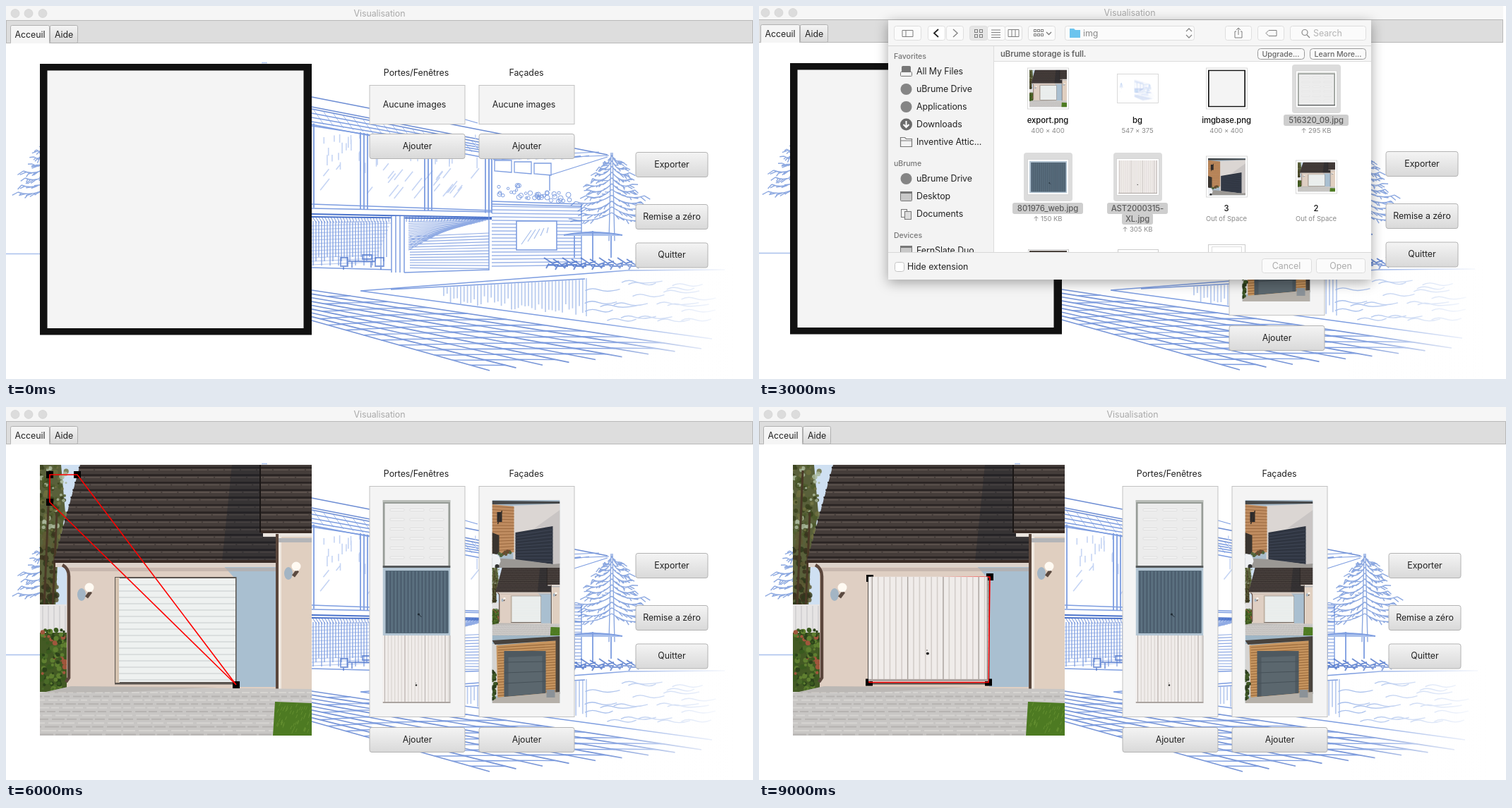
Write an HTML page that moves like this. It is 1058 px wide and 529 px high and loops after 10000 ms.

```html
<!DOCTYPE html>
<html lang="fr">
<head>
<meta charset="utf-8">
<title>Visualisation</title>
<style>
html, body { margin: 0; width: 100%; height: 100%; overflow: hidden; background: #fff; }
svg { display: block; }
text { font-family: Inter, "Open Sans", sans-serif; letter-spacing: -.06px; white-space: pre; }
#win { animation: nudge 10s step-end infinite; }
#dialog { filter: drop-shadow(0 4px 9px rgba(0,0,0,.35)); }
@keyframes nudge {
  0%, 40%, 100% { transform: none; }
  30% { transform: translate(-4px, -1px); }
}
</style>
</head>
<body>
<svg id="stage" width="1058" height="529" viewBox="0 0 1058 529"></svg>
<script>
let seed = 7;
const rnd = (a, b) => {
  seed = (seed * 16807) % 2147483647;
  return +(a + (b - a) * seed / 2147483647).toFixed(1);
};
const lerp = (a, b, t) => a + (b - a) * t;
const rep = (n, fn) => Array.from({ length: n }, (_, i) => fn(i)).join('');
const seg = (x1, y1, x2, y2) => `M${x1} ${y1}L${x2} ${y2}`;
const line = (d, color, w = 1, more = '') =>
  `<path d="${d}" fill="none" stroke="${color}" stroke-width="${w}" ${more}/>`;
const rect = (x, y, w, h, fill, more = '') =>
  `<rect x="${x}" y="${y}" width="${w}" height="${h}" fill="${fill}" ${more}/>`;
const box = (x, y, w, h, fill, edge, r = 0) =>
  rect(x + .5, y + .5, w - 1, h - 1, fill, `stroke="${edge}" rx="${r}"`);
const poly = (pts, fill, more = '') => `<polygon points="${pts}" fill="${fill}" ${more}/>`;
const dot = (x, y, r, fill, more = '') => `<circle cx="${x}" cy="${y}" r="${r}" fill="${fill}" ${more}/>`;
const text = (x, y, s, { anchor = 'middle', size = 12.4, fill = '#222', weight = 400 } = {}) =>
  `<text x="${x}" y="${y + size * .36}" text-anchor="${anchor}" font-size="${size}" fill="${fill}" font-weight="${weight}">${s}</text>`;
const symbol = (id, view, body) =>
  `<symbol id="${id}" viewBox="${view}" preserveAspectRatio="none">${body}</symbol>`;
const use = (id, x, y, w, h) => `<use href="#${id}" x="${x}" y="${y}" width="${w}" height="${h}"/>`;
const blur = (r, body) => `<g style="filter: blur(${r}px)">${body}</g>`;

// Shows its content between two seconds of the loop.
const rules = new Set();
const during = (from, to, body) => {
  rules.add(`@keyframes s${from}_${to} { 0% { visibility: hidden } ${from * 10}% { visibility: visible }
    ${to < 10 ? `${to * 10}% { visibility: hidden }` : ''} }`);
  return `<g style="animation: s${from}_${to} 10s step-end infinite">${body}</g>`;
};

// ---- Blue house sketch behind the controls
function tree(cx, top, levels, step, reach) {
  const foot = top + levels * step + 35;
  let d = seg(cx - 1, top, cx - 4, foot) + seg(cx + 1, top, cx + 4, foot);
  for (let i = 0; i < levels; i++) {
    for (const side of [-1, 1]) {
      const y = top + 3 + i * step, w = reach * Math.min(1, .25 + i / levels) * rnd(.7, 1.05);
      const at = t => [cx + side * w * t, y + 26 * t * (1 - t) + 9 * t];
      d += `M${cx} ${y}Q${cx + side * w / 2} ${y + 17} ${cx + side * w} ${y + 9}`;
      d += rep(9, k => {
        const [x, yy] = at((k + 1) / 9);
        return seg(x, yy, x + side * rnd(2, 9), yy + rnd(0, 6));
      });
    }
  }
  return line(d, '#5c83d3', 1.4, 'opacity=".7"');
}

function sketch() {
  const faint = '#c6d5f4', pale = '#a9c0ec', mid = '#7d9de0', dark = '#4a72ca';
  let s = line(seg(0, 351.5, 48, 351.5) + seg(362, 80.5, 370, 80.5), pale, 1.5);
  s += tree(62, 182, 8, 10, 50);

  // roof
  s += line(seg(433, 129, 852, 211) + seg(433, 143, 690, 193) + seg(433, 146, 690, 197), dark, 1.7, 'opacity=".8"');
  s += line(rep(4, i => seg(433, 152 + i * 6, 690, 201 + i * 3)), mid, 1.3) +
    line(rep(18, i => seg(435 + i * 14, 146 + i * 2.8, 450 + i * 14, 168 + i * 2.6)), mid, 1, 'opacity=".7"');
  s += line(seg(640, 158, 668, 166) + seg(690, 218, 854, 212) + seg(690, 214, 840, 207) + seg(770, 240, 852, 214) +
    rep(9, i => seg(690 + i * 12, 217, 730 + i * 12, 214 - i * .2)), mid, 1.1);
  s += line(rep(3, i => `M${692 + i * 28} ${219 + i * 2}h24v17l-24 -2z`), mid, 1.3);

  // upper glazing
  s += line(rep(40, () => {
    const x = rnd(450, 675), y = rnd(180, 225);
    return seg(x, y, x, y + rnd(5, 16));
  }) + rep(26, () => {
    const x = rnd(440, 660), y = rnd(222, 262), l = rnd(8, 18);
    return seg(x, y + l, x + l * .8, y);
  }), faint, 1.6);
  s += line([436, 502, 507, 512, 593, 598, 603, 679, 684, 688].map((x, i) =>
    seg(x, 166 + (x - 433) * .19, x, 286 + (x - 433) * .03)).join(''), mid, 1.8);
  s += line(seg(433, 168, 688, 217) + seg(433, 281, 688, 290) + seg(433, 287, 688, 292), mid, 1.5);

  // lower storey
  s += line(seg(433, 295, 688, 300) + seg(433, 299, 688, 302), dark, 2.2);
  s += line(rep(58, i => seg(434 + i * 4.3, 299, 440 + i * 4.1, 308 - i * .06)), dark, 1.2, 'opacity=".6"');
  s += line(rep(27, i => seg(435 + i * 4, 305, 435 + i * 4, 368 - i % 3 * 6)), mid, 1.9, 'opacity=".65"');
  s += line(rep(12, i => seg(433, 312 + i * 5, 545 - i * 2, 308 + i * 5)), mid, 1, 'opacity=".6"');
  s += line(rep(17, i => seg(570, 306 + i * 2.5, 684 - i * 4, 303 + i)) +
    rep(13, i => seg(572, 327 + i * 3.7, 684, 322 + i * 4.2)), mid, 1.2, 'opacity=".85"');
  s += rect(546, 298, 18, 80, '#fff') + line(rep(4, i => seg(546 + i * 6, 298, 546 + i * 6, 378)), mid, 1.5);
  s += line(seg(433, 371, 546, 374) + seg(564, 378, 684, 374) + seg(684, 217, 684, 375), mid, 1.4);
  s += line('M474 357h10v12h-10zM505 353h13v6h-13zM523 357h12v12h-12zM484 362h39M490 362v9M517 362v9M478 369v5M531 369v5',
    dark, 1.8, 'opacity=".7"');

  // side wing
  s += line(rep(18, i => seg(688, 284 + i * 5, 815, 286 + i * 4.8)), mid, 1.5, 'opacity=".75"');
  s += line(seg(815, 280, 815, 368) + seg(688, 281, 815, 284) + seg(688, 277, 815, 281) + seg(770, 240, 770, 262), mid, 1.4);
  s += rep(40, () => {
    const x = rnd(694, 800);
    return dot(x, rnd(x < 735 ? 254 : 264, 277), rnd(1.5, 3.5), 'none', `stroke="${mid}"`);
  });
  s += rect(723, 305, 57, 41, '#fff', `stroke="${mid}" stroke-width="1.6"`) +
    line(rep(5, i => seg(730 + i * 9, 338 - i * 4, 744 + i * 6, 318 - i)), pale, 1.2);

  s += tree(858, 208, 11, 8.2, 58);
  s += poly('790,326 830,319 873,326', pale) + line('M790 325Q830 317 873 325M831 319V362M805 326V357M857 326V357', mid, 1.8);
  s += line(rep(11, i => `M${762 + i * 13} ${357 + i % 2 * 2}l12 8l9 -3m-14 3l-4 7m9 -7l5 5m-12 -3h16`), dark, 1.9, 'opacity=".8"');

  // pool
  s += line(seg(502, 404, 880, 375) + seg(545, 402, 820, 387) + seg(880, 375, 1018, 374) + seg(502, 404, 1000, 472), mid, 1.4);
  s += line(rep(42, i => {
    const x = 620 + i * 4.8;
    return seg(x, 399 - i * .27, x, 407 + rnd(0, 16) + i * .4);
  }), pale, 1.8, 'opacity=".8"');
  s += line(seg(822, 386, 822, 440), pale, 1.4);
  s += line(rep(20, () => `M${rnd(815, 960)} ${rnd(388, 456)}q9 -5 20 -1t${rnd(18, 40)} -1`), pale, 1.4);

  // deck boards in perspective
  const at = (u, v) => [lerp(433, lerp(985, 685, v), u).toFixed(1), lerp(lerp(403, 446, v), lerp(486, 517, v), u).toFixed(1)];
  const rows = 8;
  s += line(rep(rows + 1, i => seg(...at(0, i / rows), ...at(1, i / rows))), dark, 1.6, 'opacity=".75"');
  s += line(rep(rows, i => rep(9, k => {
    const u = (k + 1 + i % 2 / 2) / 10;
    return seg(...at(u, i / rows), ...at(u - .06, (i + 1) / rows));
  })), mid, 1.4);
  return blur(.5, s) + rect(720, 366, 338, 163, 'url(#fade)');
}

// ---- Garage pictures
function garage() {
  let s = rect(48, 82, 385, 384, '#cfe0f2') + poly('48,82 78,82 84,150 74,200 70,285 48,285', '#59603a');
  s += rep(130, i => dot(rnd(46, 86), rnd(84, 190), rnd(1.5, 4), ['#39421f', '#6d7040', '#4c5a2c', '#a9b79a'][i % 4], 'opacity=".85"'));
  s += rep(70, i => dot(rnd(46, 72), rnd(180, 285), rnd(2, 5), ['#39331f', '#5d5a34', '#2f381c'][i % 3], 'opacity=".85"'));
  s += line('M62 90L54 285M72 150L66 285', '#4a3826', 3);
  s += rect(48, 280, 41, 42, '#e6e4e4') + line(rep(5, i => seg(52 + i * 8, 282, 52 + i * 8, 320)), '#c3c2c4');
  s += rect(48, 320, 42, 87, '#435a24');
  s += rep(110, i => {
    const y = rnd(316, 402);
    return dot(rnd(49, 85), y, rnd(1.5, 4), ['#3a5a1f', '#5f7f30', y < 338 || y > 355 && y < 385 ? '#a0563c' : '#4a6a28', '#2b421a'][i % 4]);
  });

  // walls
  s += rect(86, 222, 300, 178, '#dfcfc3') + poly('305,222 386,222 386,397 326,397 326,245', '#a9bfd0');
  s += rect(386, 180, 47, 222, '#e0cfc0') + rect(386, 180, 4, 222, '#f0e8e0');
  s += rect(89, 228, 297, 5, '#b9aaa2', 'opacity=".6"') + rect(386, 186, 47, 6, '#b4b5b8');

  // roof
  s += poly('105,82 433,82 433,177 383,177 383,219 68,219', '#453d3a');
  s += rep(13, i => {
    const y = 86 + i * 10.6, x = 104 - .27 * (y - 82), end = y < 172 ? 433 : 383;
    return line(seg(x, y, end, y), '#2a2423', 2.6) +
      line(seg(x, y + 3.2, end, y + 3.2), '#5d534e', 1.8, `stroke-dasharray="21 2" stroke-dashoffset="${i % 2 * 11}"`);
  });
  s += poly('320,82 360,82 360,178 383,178 383,219 306,219', '#1b2029', 'opacity=".35"');
  s += line(seg(360, 82, 360, 178), '#1b1716', 2);
  s += rect(68, 217, 316, 4, '#3a2c26') + rect(70, 221, 313, 6, '#ddd3cb');
  s += rect(361, 175, 72, 4, '#3a2c26') + rect(364, 179, 69, 5, '#ebe5df');
  s += line('M80 224Q89 229 89 240V384l-4 6', '#5b463c', 4.5) + line('M384 180V402', '#5a463b', 4);

  // door
  s += rect(154, 241, 172.5, 152.5, '#5a544f') + rect(155, 242, 6, 149, '#d5c3b0') + rect(160, 243, 165, 147, '#eef1f0');
  s += line(rep(16, i => seg(160, 252 + i * 9, 325, 252 + i * 9)), '#d3d9d9', 1.4);

  // lamps
  for (const [x, y] of [[118, 256], [411, 226]])
    s += `<ellipse cx="${x - 11}" cy="${y + 10}" rx="6" ry="9" fill="#a3b5c4"/>` +
      line(`M${x - 4} ${y + 14}l6 -8`, '#5b4a40', 5) + dot(x, y, 6.5, '#fffaf2');

  // drive
  s += poly('48,406 92,396 433,400 433,466 48,466', '#c8c6c4');
  s += rep(12, i => line(seg(48, 405 + i * 5.4, 433, 405 + i * 5.4), i % 2 ? '#b6b3b1' : '#d6d4d1', 2,
    `stroke-dasharray="${11 + i} 3 ${7 + i} 5" stroke-dashoffset="${i * 9}"`));
  s += poly('48,406 92,396 300,397 180,404', '#a49e99', 'opacity=".35"');
  s += poly('381,418 433,420 433,466 378,466', '#4d7a22');
  return s + line(rep(50, () => `M${rnd(382, 431)} ${rnd(424, 463)}l2 -5`), '#648f30');
}

const modern = () =>
  rect(0, 0, 96, 96, '#a9bccb') + poly('30,8 96,5 96,92 30,86', '#dbd6d3') + poly('60,40 96,14 96,92 86,91 86,37', '#c9c5c4') +
  poly('0,6 31,9 31,74 0,76', '#c08d61') + line(rep(15, i => seg(0, 9 + i * 4.5, 31, 11 + i * 4.2)), '#99683f') +
  rect(7, 17, 7, 14, '#2b2a2c') + line('M14 15L8 34', '#3b3128', 1.5) + poly('0,1 96,2 96,5 0,6', '#45484a') +
  poly('33,46 86,37 86,91 33,85', '#2f3541') + line(rep(10, i => seg(33, 50 + i * 4, 86, 42 + i * 5)), '#404756') +
  poly('0,46 10,50 10,76 0,78', '#39342f') + poly('0,82 33,84 86,91 96,90 96,96 0,96', '#9b9894') +
  rep(14, i => dot(rnd(10, 26), rnd(71, 80), 2.2, i % 2 ? '#52633a' : '#6b4a30')) +
  '<path d="M0 76Q11 76 12 87L8 96H0Z" fill="#eef0f3"/>' + dot(7, 94, 3, '#333');

const wooden = () =>
  rect(0, 0, 96, 96, '#9fb6c6') + rect(0, 12, 8, 74, '#d4d3d1') + poly('6,14 92,7 90,82 8,88', '#c7955f') +
  line(rep(19, i => seg(8, 17 + i * 3.8, 90, 12 + i * 3.7)), '#9a6a3c', 1.1) + poly('0,7 96,1 96,7 4,13', '#47423d') +
  rect(90, 7, 6, 76, '#4a443d') + poly('17,22 76,22 76,82 17,87', '#4e5960') +
  poly('23,31 71,29 71,82 23,86', '#5b676e') + line(rep(3, i => seg(17, 38 + i * 15, 76, 37 + i * 14)), '#465158') +
  poly('0,89 96,80 96,96 0,96', '#b5b0a9') + rect(77, 77, 12, 11, '#8b9298') +
  rep(22, i => dot(rnd(0, 6), rnd(50, 90), 2.5, i % 2 ? '#3f5826' : '#2a3c1c'));

const panelDoor = () =>
  rect(0, 0, 96, 96, '#979c97') + rect(0, 0, 96, 3, '#b9bdb8') + rect(3, 5, 90, 88, '#ececec') +
  rep(6, i => rep(3, k => box(10 + k * 28, 12 + i * 13.5, 21, 4, '#f4f4f4', '#dedede', 1))) +
  rect(0, 93, 96, 3, '#55585a');

const slateDoor = () =>
  rect(0, 0, 96, 96, '#b3c5d3') + rect(4, 4, 89, 89, '#566a79') +
  line(rep(18, i => seg(6 + i * 5, 5, 6 + i * 5, 92)), '#48596a', 1.4) + line(rep(18, i => seg(8 + i * 5, 5, 8 + i * 5, 92)), '#647a8a', .8) +
  dot(51, 66, 1.6, '#1f2a33') + line('M51 66l4 4', '#1f2a33');

const ribbedDoor = () =>
  rect(0, 0, 96, 96, '#f0ecea') + line(rep(20, i => seg(3 + i * 4.75, 0, 3 + i * 4.75, 94)), '#d3cdc9', .9) +
  line(rep(4, i => seg(3 + i * 28.5, 0, 3 + i * 28.5, 94)), '#aaa39f', .7) +
  line('M95.5 0V96', '#8b8581') + rect(0, 94, 96, 2, '#aaa39f') + dot(47.5, 70.5, 1.2, '#222') + dot(47, 67.5, .5, '#555');

// ---- Window
const button = (x, y, w, label) => box(x, y, w, 36, 'url(#btn)', '#b3b3b3', 3) + text(x + w / 2, y + 17.5, label);
const emptyList = x => box(x, 112, 136, 56, '#f4f4f4', '#c2c2c2') + text(x + 64, 140, 'Aucune images') + button(x, 181, 136, 'Ajouter');
const fullList = (x, ids) => box(x, 112, 136, 328, '#f4f4f4', '#c2c2c2') +
  ids.map((id, i) => use(id, x + 19, 132 + i * 96, 96, 96)).join('') + button(x, 454, 136, 'Ajouter');

const quad = pts => pts.map(([x, y]) => rect(x - 5, y - 5, 10, 10, '#000')).join('') +
  poly(pts.join(' '), 'none', 'stroke="#f00" stroke-width="1.6"');

const lights = [13, 32, 52].map(x => dot(x, 10.5, 6, '#dcdcdc', 'stroke="#cfcfcf" stroke-width=".6"')).join('');
const chrome = rect(0, 0, 1058, 21, '#f6f6f6') + lights + text(529, 11, 'Visualisation', { fill: '#a9a9a9' }) +
  box(0, 20, 1058, 33, '#dddddd', '#b8b8b8') +
  box(6, 27, 56, 27, '#f5f5f5', '#b0b0b0', 2) + rect(7, 51, 54, 4, '#f5f5f5') + text(34, 41, 'Acceuil') +
  box(62, 27, 40, 26, 'url(#btn)', '#b0b0b0', 2) + text(82, 41, 'Aide') + rect(0, 53, 1058, 3, '#fff');

const TL = [62, 96], TR = [101, 96], BR = [101, 135], BL = [62, 135];
const farTR = [325, 243], farBR = [326, 394];

const windowView = use('sketch', 0, 53, 1058, 476) + chrome +
  text(581, 95, 'Portes/Fenêtres') + text(737, 95, 'Façades') +
  during(0, 4, emptyList(514.5)) + during(4, 10, fullList(514.5, ['panel', 'slate', 'ribbed'])) +
  during(0, 2, emptyList(669.5)) + during(2, 10, fullList(669.5, ['modern', 'garage', 'wooden'])) +
  button(891.5, 207, 103, 'Exporter') + button(891.5, 281, 103, 'Remise a zéro') + button(891.5, 335.5, 103, 'Quitter') +
  during(0, 5, rect(48, 82, 385, 384.5, '#111') + rect(58.5, 91.5, 363, 365.5, '#f4f4f4')) +
  during(5, 10, use('garage', 48, 82, 385, 384)) +
  during(5, 6, quad([TL, TR, BR, BL])) +
  during(6, 7, quad([TL, TR, farBR, BL])) +
  during(7, 8, quad([TL, farTR, farBR, BL])) +
  during(8, 9, quad([[157, 243], farTR, farBR, [156, 390]])) +
  during(9, 10, quad([[157, 243], [327, 241], [325, 390.5], [156, 390.5]]) + use('ribbed', 155, 240.5, 169.5, 148.5));

// ---- File dialog
const left = { anchor: 'start' };
const grey = '#7d7d7d';
const tool = (x, w, body = '', fill = '#fbfbfb') => box(x, 28, w, 21, fill, '#dedede', 3) + body;

const toolbar = rect(183, 20, 684, 36, '#f6f6f6') +
  tool(191, 39, line('M203 34.500h15v9h-15zM208 34v10', grey)) +
  tool(239, 25, line('M254 33l-6 5.500 6 5.500', '#222', 1.8), '#fff') + tool(265, 25, line('M275 33l6 5.500-6 5.500', '#888', 1.5)) +
  tool(298, 26, rep(4, i => box(305 + i % 2 * 7, 33 + (i >> 1) * 7, 5, 5, 'none', grey)), '#e6e6e6') +
  tool(323, 26, line('M329 34h13M329 37.500h13M329 41h13M329 44.500h13', grey)) +
  tool(348, 25, line('M353 33.500h15v10h-15zM358 34v9M363 34v9', grey)) +
  tool(381, 39, rep(6, i => box(389 + i % 3 * 5, 33 + (i / 3 | 0) * 6, 4, 4, 'none', grey)) + line('M407 37l3.500 3.500 3.500-3.500', grey, 1.4)) +
  tool(433, 184, '<path d="M440 32h6l2 2h7v11h-15z" fill="#6cc4ee"/>' + text(459, 39, 'img', { ...left, fill: '#8a8a8a' }) +
    line('M605 36l4-4 4 4M605 41l4 4 4-4', '#888', 1.3)) +
  tool(660, 38, line('M676 36h-2v9h10v-9h-2M679 41V31m-3 3l3-3 3 3', grey)) +
  tool(706, 38, line('M718 38.500l4-4h11v8h-11z', grey)) +
  tool(752, 108, dot(773, 37.500, 4, 'none', 'stroke="#888" stroke-width="1.2"') + line('M776 41l4 4', '#888', 1.3) +
    text(785, 39, 'Search', { ...left, fill: '#b4b4b4' }));

const icons = {
  tray: y => box(202, y - 8, 13, 11, '#777', '#777', 1) + box(200, y, 17, 7, '#f3f3f3', '#777', 1),
  disc: y => dot(208.5, y, 8, '#858585'),
  down: y => dot(208.5, y, 8.5, '#6b6b6b') + line(`M208.500 ${y - 5}v9m-4-4l4 4 4-4`, '#fff', 2),
  folder: y => line(`M200.500 ${y - 6.5}h6l2 2h8v11h-16zM200.500 ${y - 2}h16`, '#777', 1.2),
  desk: y => box(200, y - 7, 17, 14, '#c9c9c9', '#777', 1) + rect(200, y - 7, 17, 3, '#777'),
  pages: y => box(201, y - 7, 9, 12, '#f3f3f3', '#777') + box(206, y - 4, 10, 12, '#ddd', '#777')
};
const item = (y, icon, label) => icons[icon](y) + text(223, y, label, left);
const head = (y, label) => text(191, y, label, { ...left, size: 10.6, fill: '#777', weight: 500 });

const sidebar = rect(183, 56, 150, 294, '#f3f3f3') + line(seg(332.5, 56, 332.5, 349), '#dcdcdc') +
  head(71, 'Favorites') + item(93, 'tray', 'All My Files') + item(118, 'disc', 'uBrume Drive') +
  item(143, 'disc', 'Applications') + item(168, 'down', 'Downloads') + item(193, 'folder', 'Inventive Attic...') +
  head(223, 'uBrume') + item(245, 'disc', 'uBrume Drive') + item(270, 'desk', 'Desktop') + item(295, 'pages', 'Documents') +
  head(325, 'Devices') + item(347, 'desk', 'FernSlate Duo');

const thumb = (id, cx, cy, w, h) =>
  rect(cx - w / 2 - 2.5, cy - h / 2 - 2.5, w + 5, h + 5, '#fff', 'stroke="#d0d0d0" stroke-width=".8"') +
  use(id, cx - w / 2, cy - h / 2, w, h);
const mark = (cx, y) => rect(cx - 34.5, y, 69, 69, '#dcdcdc', 'rx="4"');
const pill = (cx, y, w) => rect(cx - w / 2, y - 8, w, 16, '#cecece', 'rx="3"');
const name = (x, y, s, fill = '#111') => text(x, y, s, { size: 11.3, weight: 500, fill });
const note = (x, y, s) => text(x, y, s, { size: 9.5, fill: '#8a8a8a' });
const soft = '#5c5c5c';

const files = rect(333, 56, 534, 294, '#fff') + rect(333, 56, 534, 22, '#f6f6f6') + line(seg(333, 78.5, 867, 78.5), '#dcdcdc') +
  text(342, 68, 'uBrume storage is full.', { ...left, size: 11.3, weight: 600, fill: '#666' }) +
  box(706, 60, 67, 16, '#fafafa', '#999', 4) + text(739, 68, 'Upgrade...', { size: 10.6, fill: '#666', weight: 500 }) +
  box(780, 60, 80, 16, '#fafafa', '#999', 4) + text(820, 68, 'Learn More...', { size: 10.6, fill: '#666', weight: 500 }) +
  thumb('garage', 409.5, 117, 53, 53) + name(409, 162, 'export.png') + note(409, 177, '400 × 400') +
  thumb('sketch', 536.5, 117, 53, 36) + name(536, 162, 'bg') + note(536, 177, '547 × 375') +
  thumb('blank', 662.5, 117, 53, 53) + name(662, 162, 'imgbase.png') + note(662, 177, '400 × 400') +
  mark(789.5, 83) + thumb('panel', 789.5, 118, 53, 47) + pill(789, 162, 92) + name(789, 162, '516320_09.jpg', soft) + note(789, 177, '↑ 295 KB') +
  mark(409.5, 208) + thumb('slate', 409.5, 242.5, 53, 45) + pill(409, 287, 100) + name(409, 287, '801976_web.jpg', soft) + note(409, 302, '↑ 150 KB') +
  mark(536.5, 208) + thumb('ribbed', 536.5, 242.5, 55, 47) + pill(536, 287, 86) + pill(536, 302, 44) +
  name(536, 287, 'AST2000315-', soft) + name(536, 302, 'XL.jpg', soft) + note(536, 317, '↑ 305 KB') +
  thumb('modern', 662.5, 242, 53, 53) + name(662, 287, '3') + note(662, 302, 'Out of Space') +
  thumb('garage', 789.5, 242.5, 53, 42) + name(789, 287, '2') + note(789, 302, 'Out of Space') +
  box(381, 345, 58, 12, '#fff', '#ccc') + rect(383, 347, 53, 8, '#4a423c') + box(508, 345, 58, 12, '#fff', '#ccc') +
  box(636, 338, 53, 20, '#fff', '#ccc') + box(641, 341, 43, 20, '#fff', '#ddd');

const footer = rect(183, 349, 684, 39, '#f4f4f4') + line(seg(183, 349.5, 867, 349.5), '#d8d8d8') +
  box(192, 363, 14, 14, '#fff', '#c4c4c4', 3) + text(210, 370, 'Hide extension', left) +
  box(712, 358, 71, 21, '#fbfbfb', '#dcdcdc', 3) + text(747, 369, 'Cancel', { fill: '#ababab' }) +
  box(789, 358, 70, 21, '#fbfbfb', '#dcdcdc', 3) + text(824, 369, 'Open', { fill: '#ababab' });

const dialog = `<g id="dialog">${rect(183, 20, 684, 368, '#fff')}${sidebar}${files}${toolbar}
  ${line(seg(183, 56.5, 867, 56.5), '#d6d6d6')}${footer}</g>`;

const defs = `
  <linearGradient id="btn" x2="0" y2="1"><stop stop-color="#f4f4f4"/><stop offset="1" stop-color="#d9d9d9"/></linearGradient>
  <linearGradient id="fade"><stop offset=".35" stop-color="#fff" stop-opacity="0"/><stop offset=".92" stop-color="#fff"/></linearGradient>` +
  symbol('sketch', '0 53 1058 476', sketch()) + symbol('garage', '48 82 385 384', blur(.4, garage())) +
  symbol('modern', '0 0 96 96', modern()) + symbol('wooden', '0 0 96 96', wooden()) +
  symbol('panel', '0 0 96 96', panelDoor()) + symbol('slate', '0 0 96 96', slateDoor()) +
  symbol('ribbed', '0 0 96 96', ribbedDoor()) +
  symbol('blank', '0 0 96 96', rect(0, 0, 96, 96, '#111') + rect(3, 3, 90, 90, '#f4f4f4'));

const view = `<defs>${defs}</defs><g id="win">${windowView}</g>${during(3, 4, dialog)}`;
document.head.insertAdjacentHTML('beforeend', `<style>${[...rules].join('\n')}</style>`);
document.getElementById('stage').innerHTML = view;
</script>
</body>
</html>
```
